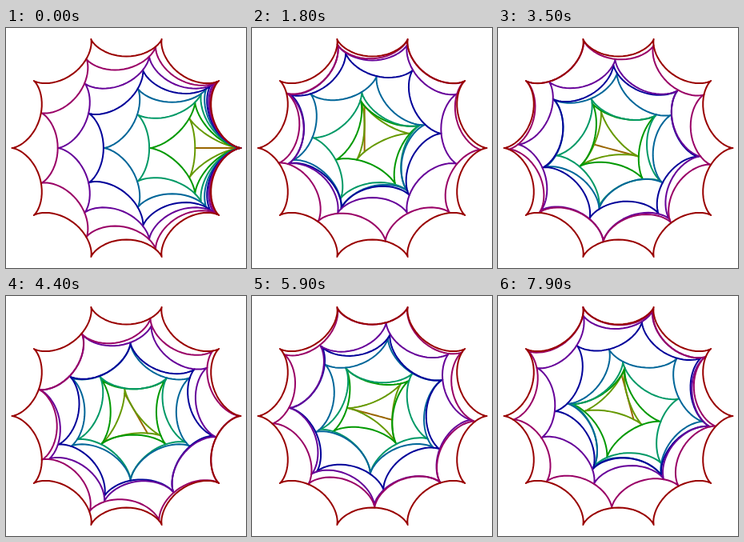
These frames come from a looping animation (300 px wide and 300 px high, 8 s). An HTML page with a canvas:

```html
<!DOCTYPE html>
<html lang="en">
<head>
<meta charset="utf-8">
<title>Nested rolling hypocycloids</title>
<style>
  html, body { margin: 0; width: 100%; height: 100%; overflow: hidden; background: #fff; }
  canvas { display: block; width: 300px; height: 300px; }
</style>
</head>
<body>
<canvas id="stage"></canvas>
<script>
const SIZE = 300, CX = 150.5, CY = 150;
const UNIT = 14.3;             // radius of the generating circle
const MAX = 10, MIN = 2;       // cusps of the outermost and innermost curve
const LOOP = 8000, STEP = 100; // ms
const TURN = 2 * Math.PI / 192; // angle each curve slides per step
const ARC = 28;                // segments from cusp to cusp

const canvas = document.getElementById('stage');
const ctx = canvas.getContext('2d');
const dpr = window.devicePixelRatio || 1;
canvas.width = canvas.height = SIZE * dpr;
ctx.scale(dpr, dpr);
ctx.lineWidth = 2;
ctx.lineJoin = ctx.lineCap = 'round';

// Hypocycloid with n cusps, centred on (x, y) in units, y upwards
function hypocycloid(n, x, y, rot) {
  ctx.beginPath();
  for (let i = 0; i < n * ARC; i++) {
    const t = 2 * Math.PI * i / (n * ARC);
    const a = rot + t, b = rot - (n - 1) * t;
    const px = x + (n - 1) * Math.cos(a) + Math.cos(b);
    const py = y + (n - 1) * Math.sin(a) + Math.sin(b);
    ctx.lineTo(CX + UNIT * px, CY - UNIT * py);
  }
  ctx.closePath();
  ctx.strokeStyle = `hsl(${(n - 1) * 40 % 360}, 100%, 30%)`;
  ctx.stroke();
}

function draw(theta) {
  ctx.fillStyle = '#fff';
  ctx.fillRect(0, 0, SIZE, SIZE);
  // Each curve rolls inside the next larger one, all its cusps touching it
  const curves = [];
  let x = 0, y = 0, rot = 0;
  for (let n = MAX; n >= MIN; n--) {
    curves.push([n, x, y, rot]);
    const dir = rot - (n - 1) * theta;
    x += Math.cos(dir);
    y += Math.sin(dir);
    rot += theta;
  }
  curves.reverse().forEach(c => hypocycloid(...c));
}

const start = performance.now();
function frame() {
  const ms = (performance.now() - start) % LOOP;
  draw(Math.floor(ms / STEP) * TURN);
  requestAnimationFrame(frame);
}
frame();
</script>
</body>
</html>
```
